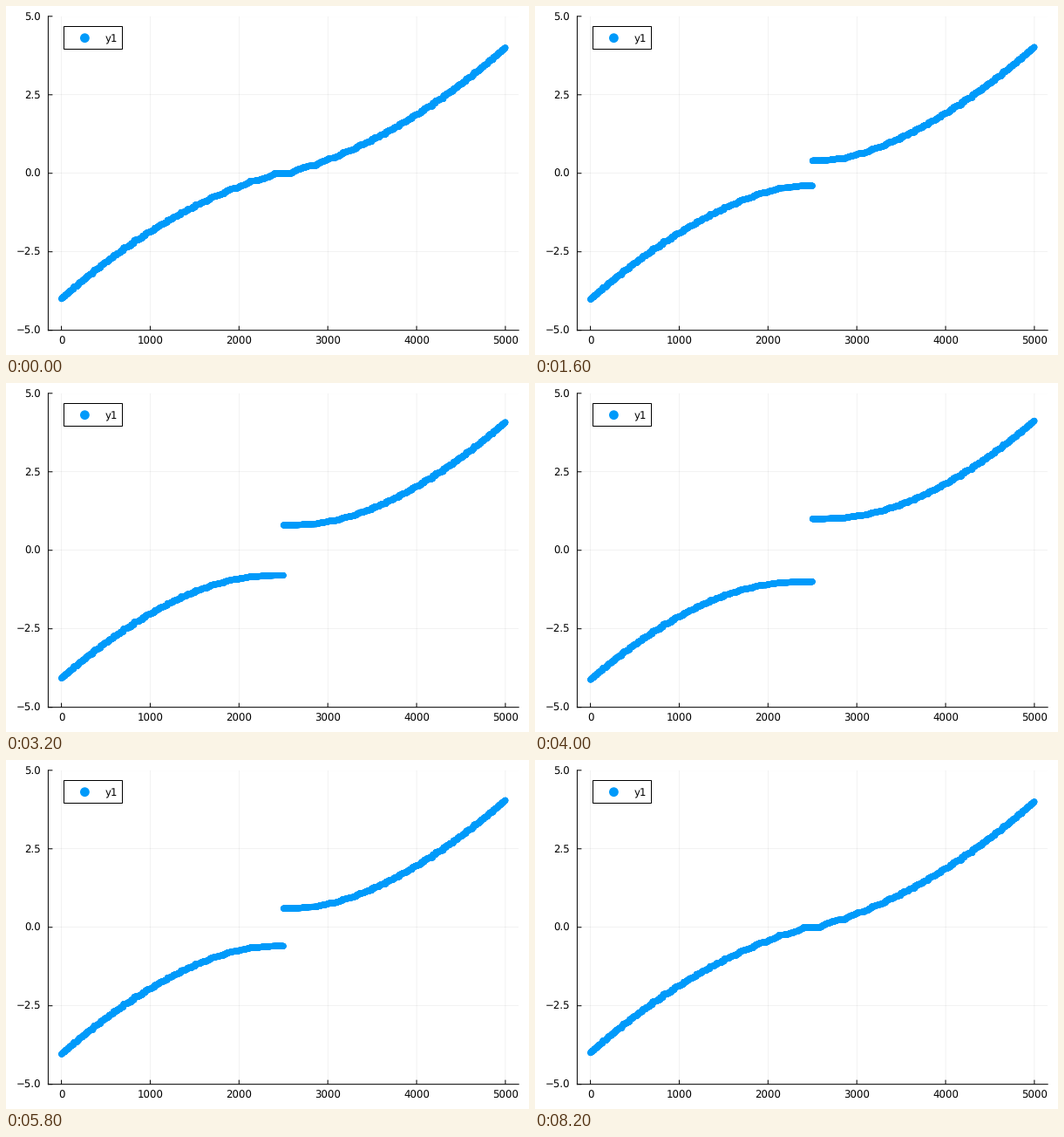
Recreate the animation shown at these times as a matplotlib script. Size 600 by 400 pixels, loop 8400 ms.

```python
import numpy as np
import matplotlib.pyplot as plt
from matplotlib.animation import FuncAnimation
from matplotlib.patches import Circle, Rectangle

W, H, DPI = 600, 400, 100
BLUE = "#009AFA"
LEFT, RIGHT, TOP, BOTTOM = 48.4, 588.19, 11.81, 371.66  # plot area in pixels
X0, X1, Y0, Y1 = -149, 5150, -5, 5                      # data limits
TICK = 5       # tick length in pixels
SIZE = 50      # lattice sites per side
STEPS = 20     # mass steps from 0 to 1


def pt(px):
    return px * 72 / DPI


# Band energies of a periodic square lattice
k = 2 * np.pi * np.arange(SIZE) / SIZE
band = 2 * (np.cos(k)[:, None] + np.cos(k)[None, :]).ravel()
index = np.arange(1, 2 * SIZE**2 + 1)


def spectrum(mass):
    upper = np.sqrt(band**2 + mass**2)
    return np.sort(np.concatenate([-upper, upper]))


def mass_at(frame):
    """Rise from 0 to 1, hold one frame, fall back to 0."""
    return min(frame, 2 * STEPS + 1 - frame) / STEPS


plt.rcParams.update({"font.family": "DejaVu Sans", "font.size": 8.5,
                     "text.hinting": "none", "path.snap": False})
fig = plt.figure(figsize=(W / DPI, H / DPI), dpi=DPI, facecolor="white")

ax = fig.add_axes([LEFT / W, 1 - BOTTOM / H, (RIGHT - LEFT) / W, (BOTTOM - TOP) / H])
xticks, yticks = np.arange(0, 5001, 1000), np.arange(-5, 5.1, 2.5)
ax.set(xlim=(X0, X1), ylim=(Y0, Y1), xticks=xticks, yticks=yticks)
ax.spines[["top", "right"]].set_visible(False)
ax.spines[["left", "bottom"]].set_linewidth(pt(1))
ax.tick_params(axis="x", length=0, pad=pt(6.6))
ax.tick_params(axis="y", length=0, pad=pt(8.3))
ax.grid(color="black", alpha=0.1, linewidth=pt(0.5))
ax.set_axisbelow(True)

# Inward ticks
line = dict(color="black", linewidth=pt(1), clip_on=False)
ax.vlines(xticks, Y0, Y0 + TICK * (Y1 - Y0) / (BOTTOM - TOP), **line)
ax.hlines(yticks, X0, X0 + TICK * (X1 - X0) / (RIGHT - LEFT), **line)

dots = ax.scatter(index, spectrum(0), s=pt(7)**2, c=BLUE,
                  edgecolors="none", clip_on=False, zorder=3)
ax.set(xlim=(X0, X1), ylim=(Y0, Y1))

# Legend, laid out in pixels
legend = fig.add_axes([0, 0, 1, 1])
legend.set(xlim=(0, W), ylim=(H, 0))
legend.axis("off")
legend.add_patch(Rectangle((66.5, 23.5), 67, 26, facecolor="white",
                           edgecolor="black", linewidth=pt(1)))
legend.add_patch(Circle((90.4, 36.7), 5.4, facecolor=BLUE, linewidth=0))
legend.text(114, 41, "y1", va="baseline")


def draw(frame):
    dots.set_offsets(np.column_stack([index, spectrum(mass_at(frame))]))
    return [dots]


anim = FuncAnimation(fig, draw, frames=2 * STEPS + 2, interval=200, repeat=True)
plt.show()
```
